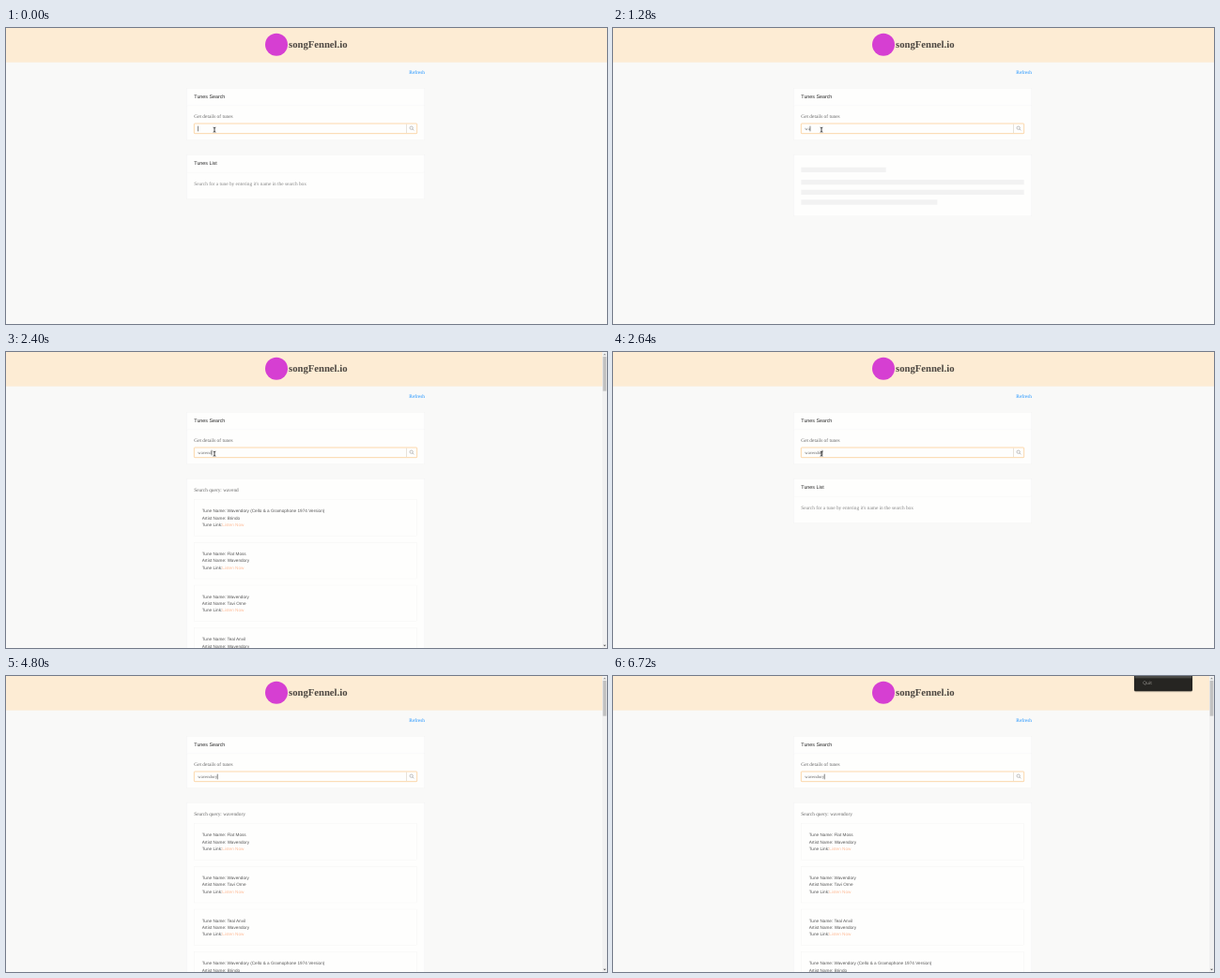
Write an HTML page that moves like this. It is 640 px wide and 316 px high and loops after 6800 ms.

```html
<!DOCTYPE html>
<html lang="en">
<head>
<meta charset="utf-8">
<title>Tunes Search</title>
<style>
  html, body { margin: 0; width: 100%; height: 100%; overflow: hidden; background: #f9f9f8; }
  svg { display: block; width: 100%; height: 100%; }
  text { font: 16px "Liberation Serif", serif; fill: #666; text-rendering: geometricPrecision; white-space: pre; }
  .sans { font-family: "Liberation Sans", sans-serif; fill: #262626; }
  .small { font-size: 14px; }
  .row { fill: #555; }
  .link { fill: #ffbb96; }
  .hint { fill: #858585; }
  .card { fill: #fefefd; stroke: #f0f0f0; }
  .rule { stroke: #f0f0f0; }
  .bone { fill: #f2f2f2; }
</style>
</head>
<body>
<svg viewBox="0 0 1920 948">
  <rect width="1920" height="110" fill="#fdecd4"/>
  <circle cx="864" cy="53" r="36" fill="#d63fd2"/>
  <text x="903" y="64" style="font-size:32px;font-weight:bold;fill:#4b4640">songFennel.io</text>
  <text x="1288" y="146" style="fill:#1890ff">Refresh</text>

  <rect class="card" x="577.5" y="192.5" width="760" height="167"/>
  <path class="rule" d="M578 248.5H1337"/>
  <text class="sans" x="601" y="224">Tunes Search</text>
  <text x="601" y="289">Get details of tunes</text>
  <rect x="601" y="306" width="712" height="32" rx="2" fill="#fefefd" stroke="#fbcf9a" stroke-width="2.5"/>
  <path d="M1279.5 308V336" stroke="#dcd3c8" stroke-width="2"/>
  <g fill="none" stroke="#8c8c8c" stroke-width="1.6"><circle cx="1295" cy="320" r="5"/><path d="M1298.500 323.500L1303 328"/></g>
  <text class="small" id="query" x="613" y="326.500"></text>
  <path id="caret" d="M0 314V331" stroke="#333" stroke-width="1.8"/>

  <g id="list">
    <rect class="card" x="577.5" y="406.5" width="760" height="142"/>
    <path class="rule" d="M578 463H1337"/>
    <text class="sans" x="601" y="438">Tunes List</text>
    <text class="hint" x="601" y="503">Search for a tune by entering it's name in the search box</text>
  </g>

  <g id="bones">
    <rect class="card" x="577.5" y="406.5" width="760" height="196"/>
    <rect class="bone" x="601" y="446" width="271" height="16"/>
    <rect class="bone" x="601" y="486" width="712" height="16"/>
    <rect class="bone" x="601" y="518" width="712" height="16"/>
    <rect class="bone" x="601" y="550" width="435" height="16"/>
  </g>

  <g id="results">
    <rect class="card" x="577.5" y="406.5" width="760" height="600"/>
    <text id="heading" x="601" y="446"></text>
    <g id="items"></g>
    <rect x="1905" width="15" height="948" fill="#f1f1f1"/>
    <rect id="thumb" x="1907" y="15" width="11" fill="#c1c1c1"/>
    <path d="M1908 10l4.500-5 4.500 5z" fill="#8a8a8a"/>
    <path d="M1908 938l4.500 5 4.500-5z" fill="#505050"/>
  </g>

  <path id="beam" d="M662 318.500q4 0 4 2.500q0-2.500 4-2.500M666 321V331M662 333.500q4 0 4-2.500q0 2.500 4 2.500" fill="none" stroke="#222" stroke-width="2.6"/>

  <g id="menu">
    <path d="M1664 0H1852V46q0 6-6 6H1670q-6 0-6-6z" fill="#000" opacity=".18"/>
    <path d="M1665 0H1851V44q0 5-5 5H1670q-5 0-5-5z" fill="#262522"/>
    <rect x="1667" width="182" height="7" fill="#4a4945"/>
    <text x="1693" y="26" style="font:14.500px 'Open Sans',sans-serif;fill:#a5a39e">Quit</text>
  </g>
  <path id="arrow" d="M0 0V18L4.500 14L7.500 21L10.500 19.500L7.500 13H13Z" fill="#111" stroke="#fff"/>
</svg>
<script>
const $ = id => document.getElementById(id);
const LOOP = 6800, WORD = "wavendory";

const tunes = [
  ["Flat Moss", "Wavendory"],
  ["Wavendory", "Tavi Orne"],
  ["Teal Anvil", "Wavendory"],
  ["Wavendory (Cello & a Gramophone 1974 Version)", "Brindo"]
];

// [start, letters typed, panel, letters searched]
const steps = [
  [0, 0, "list"], [800, 1, "list"], [960, 1, "bones"], [1120, 1, "results", 1],
  [1280, 2, "bones"], [1360, 3, "results", 2], [1600, 4, "results", 3], [1760, 4, "bones"],
  [1920, 5, "bones"], [2080, 5, "list"], [2240, 6, "list"], [2400, 6, "results", 6],
  [2480, 7, "results", 6], [2640, 8, "list"], [2880, 9, "list"], [3040, 9, "results", 9]
];
const caretOff = [[640, 800], [3360, 3840], [4320, 4800], [5280, 5760], [6240, 6720]];

const show = (id, on) => $(id).style.display = on ? "" : "none";
const within = (t, a, b) => t >= a && t < b;
const escape = s => s.replace("&", "&amp;");
const line = (y, s) => `<text class="sans small row" x="626" y="${y}">${s}</text>`;

function item(i, shift) {
  const [name, artist] = tunes[(i + shift) % tunes.length];
  const y = 473 + 137 * i;
  return `<rect class="card" x="601.5" y="${y}" width="711" height="116"/>` +
    line(y + 41, "Tune Name: " + escape(name)) +
    line(y + 63, "Artist Name: " + artist) +
    line(y + 85, 'Tune Link:<tspan class="link">Listen Now</tspan>');
}

let current;
function apply(step) {
  if (step === current) return;
  current = step;
  const [, typed, panel, searched] = step;
  $("query").textContent = WORD.slice(0, typed);
  const end = 613.5 + (typed ? $("query").getComputedTextLength() : 0);
  $("caret").setAttribute("transform", `translate(${end})`);
  for (const id of ["list", "bones", "results"]) show(id, id === panel);
  if (panel !== "results") return;
  const shift = WORD.length - searched;
  $("heading").textContent = "Search query: " + WORD.slice(0, searched);
  $("items").innerHTML = tunes.map((_, i) => item(i, shift)).join("");
  $("thumb").setAttribute("height", 113 - shift);
}

function draw(now) {
  const t = now % LOOP;
  apply(steps.findLast(s => s[0] <= t));
  show("caret", !caretOff.some(([a, b]) => within(t, a, b)));
  show("beam", t < 4320);
  show("menu", t >= 5200);
  show("arrow", within(t, 5840, 6080));
  $("arrow").setAttribute("transform", `translate(${t < 5920 ? 1621 : 1615} 6)`);
}

const start = performance.now();
function frame() {
  draw(performance.now() - start);
  requestAnimationFrame(frame);
}
frame();
</script>
</body>
</html>
```
